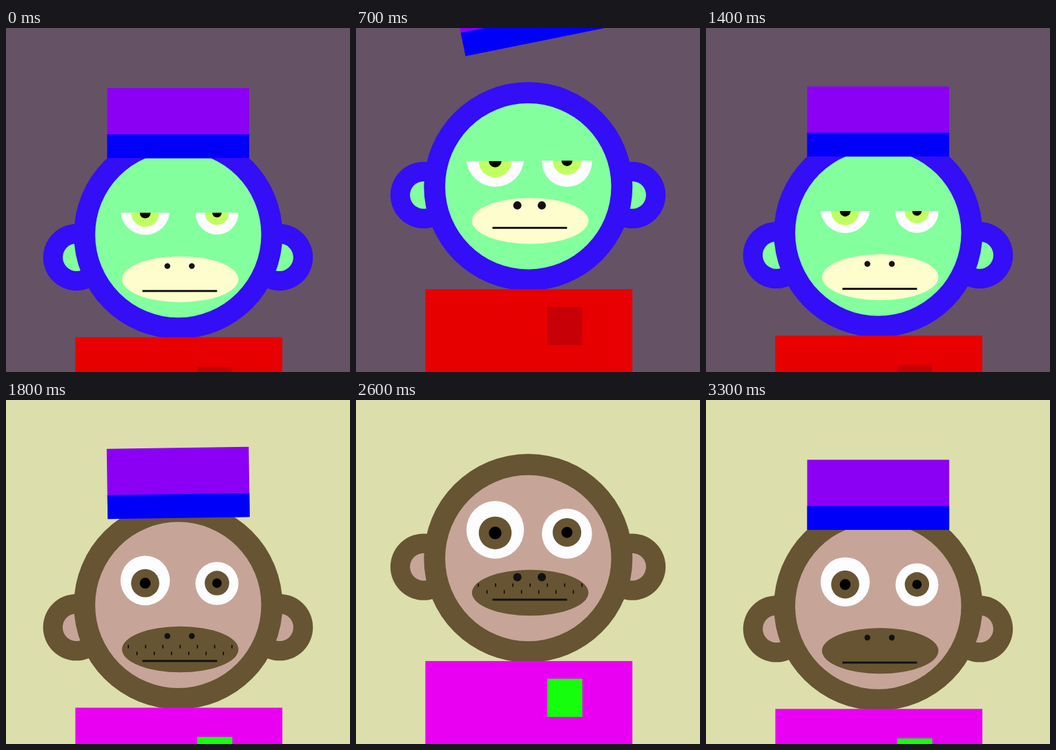
An HTML page with a canvas that plays this animation: 498 px wide and 498 px high, repeating every 3400 ms.

```html
<!DOCTYPE html>
<html lang="en">
<head>
<meta charset="utf-8">
<title>Hat toss</title>
<style>
html, body { margin: 0; width: 100%; height: 100%; overflow: hidden; }
canvas { display: block; width: 498px; height: 498px; }
</style>
</head>
<body>
<canvas width="498" height="498"></canvas>
<script>
const ctx = document.querySelector('canvas').getContext('2d');
const CYCLE = 17, STEP = 100, MID = 249.3;

// Each look also holds its rise time and the flight of its hat.
const sleepy = {
  bg: '#665265', fur: '#330ef6', face: '#83ff9d', muzzle: '#fdfdcd', iris: '#c0ff60',
  shirt: '#e70000', pocket: '#c70007', lids: true,
  rise: 7.7, toss: { from: 3.6, to: 12.4, force: 5.3, perDegree: 8.5 }
};
const awake = {
  bg: '#dcdfab', fur: '#665433', face: '#c6a598', muzzle: '#665433', iris: '#665433',
  shirt: '#e900f3', pocket: '#15ff0c', lids: false,
  rise: 5, toss: { from: 0.8, to: 12.07, force: 7, perDegree: 18.8 }
};

const mix = (a, b, p) => a + (b - a) * p;
const easeInOut = x => x >= 1 ? 1 : x < 0.5 ? 4 * x ** 3 : 1 - 4 * (1 - x) ** 3;

function lift(t, rise) {
  return t < 11 ? easeInOut(t / rise) : 1 / (1 + 0.84 * (t - 11) ** 3.2);
}

function rect(x, y, w, h, color) {
  ctx.fillStyle = color;
  ctx.fillRect(x, y, w, h);
}

function oval(x, y, rx, color, ry = rx) {
  ctx.fillStyle = color;
  ctx.beginPath();
  ctx.ellipse(x, y, rx, ry, 0, 0, Math.PI * 2);
  ctx.fill();
}

function eye(x, whiteY, irisY, r, look) {
  ctx.save();
  if (look.lids) {
    ctx.beginPath();
    ctx.rect(0, irisY, 498, 100);
    ctx.clip();
  }
  oval(x, whiteY, r, '#fdfcff');
  oval(x, irisY, r * 0.57, look.iris);
  oval(x, irisY, r * 0.22, '#000');
  ctx.restore();
}

function hat(rise, t, toss) {
  const air = Math.max(0, toss.force * (t - toss.from) * (toss.to - t));
  ctx.save();
  ctx.translate(MID, 138 - rise - air);
  ctx.rotate(-air / toss.perDegree * Math.PI / 180);
  rect(-102.8, -51, 205.6, 101.5, '#8b00f5');
  rect(-102.8, 16, 205.6, 34.5, '#0000f8');
  ctx.restore();
}

function draw(frame) {
  const look = frame < CYCLE ? sleepy : awake;
  const t = frame % CYCLE;
  const p = lift(t, look.rise);
  const y = 299 - 70 * p;
  const at = (low, high) => y + mix(low, high, p);

  rect(0, 0, 498, 498, look.bg);
  for (const side of [-1, 1]) {
    const x = MID - 0.3 + side * mix(147, 151, p);
    oval(x, at(33, 12.6), 48.2, look.fur);
    oval(x, at(33, 12.6), 19.9, look.face);
  }
  oval(MID, y, 151, look.fur);
  oval(MID, y, 120.2, look.face);

  eye(201.5, at(-35.2, -41), at(-31.4, -36.6), mix(35.6, 41.7, p), look);
  eye(305.4, at(-31, -35.5), at(-31.5, -37.3), mix(31, 36.3, p), look);

  oval(252.2, at(64.7, 50), 84.3, look.muzzle, 33.2);
  const nose = at(45.6, 27.6);
  oval(233.6, nose, mix(4.2, 6, p), '#111');
  oval(269, nose, mix(4.2, 6, p), '#111');
  if (look === awake && t < 16) {
    for (let i = 0; i < 13; i++) {
      rect(176.4 + i * 12.5, at(58.5, 36.5) + i % 2 * 9.8, 1.4, 5, '#000');
    }
  }
  rect(197.5, at(80.3, 58.6), 108, 2.9, '#111');

  rect(100.4, at(148.7, 148.9), 299.7, 200, look.shirt);
  rect(277, at(191.5, 174.5), 50.6, 55.3, look.pocket);
  hat(70 * p, t, look.toss);
}

function tick() {
  draw(Math.floor(performance.now() / STEP) % (2 * CYCLE));
  requestAnimationFrame(tick);
}
tick();
</script>
</body>
</html>
```
